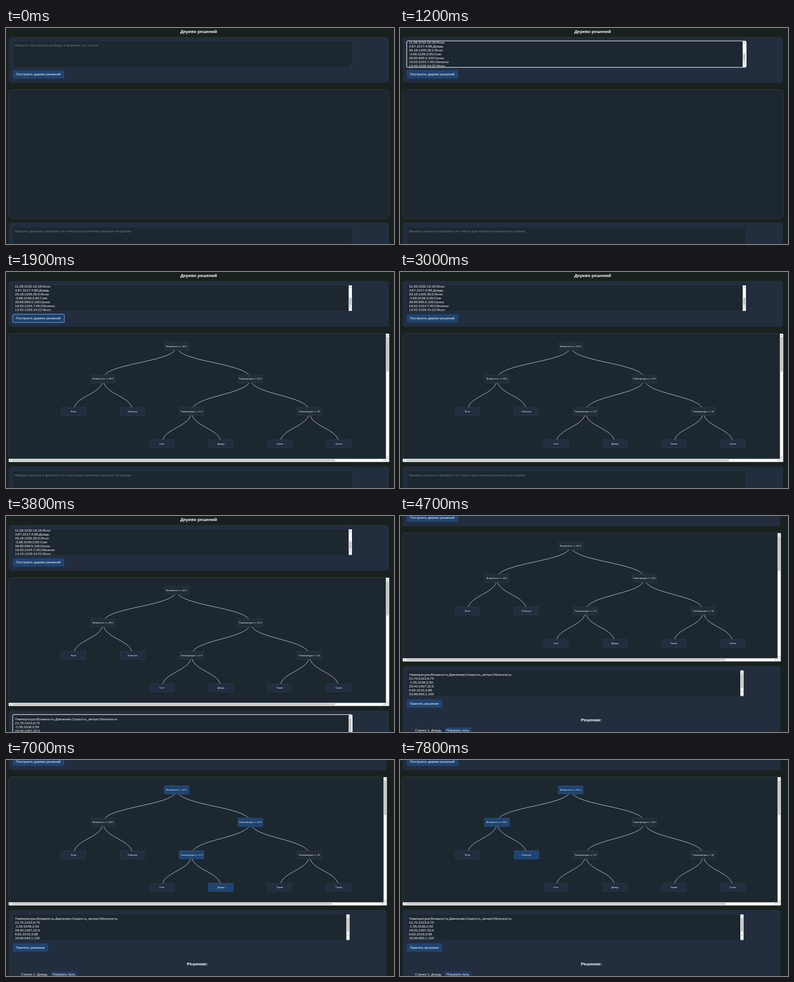
Write an HTML page that moves like this. It is 692 px wide and 388 px high and loops after 8000 ms.

```html
<!DOCTYPE html>
<html lang="ru">
<head>
<meta charset="utf-8">
<title>Дерево решений</title>
<style>
  html, body { margin: 0; width: 100%; height: 100%; overflow: hidden; background: #19211f; }
  svg { display: block; }
  text { font-family: "Liberation Sans", Arial, sans-serif; white-space: pre; }
</style>
</head>
<body>
<svg id="stage" width="692" height="388" viewBox="0 0 692 388"></svg>
<script>
const LOOP = 8000, SCROLL_AT = 4700, SCROLL = 80;
const PANEL = '#222d3e', FIELD = '#1d2730', BLUE = '#1f4471';

const trainRows = ['11;38;1032;16;18;Ясно', '3;87;1017;4;88;Дождь', '26;18;1005;35;0;Ясно',
  '-3;68;1039;3;65;Снег', '38;85;995;5;100;Гроза', '16;52;1014;7;40;Облачно', '13;42;1029;14;22;Ясно'];
const testRows = ['Температура;Влажность;Давление;Скорость_ветра;Облачность', '21;70;1013;6;75',
  '-1;55;1036;2;50', '29;40;1007;22;5', '6;92;1015;3;98', '33;96;993;1;100'];

// Each node: label, centre x, depth, parent index
const nodes = [
  ['Влажность <= 62.5', 304.4, 0],
  ['Влажность <= 46.5', 173, 1, 0],
  ['Температура <= 21.5', 436, 1, 0],
  ['Ясно', 120.5, 2, 1],
  ['Облачно', 225.7, 2, 1],
  ['Температура <= 1.5', 330.8, 2, 2],
  ['Температура <= 31', 541, 2, 2],
  ['Снег', 278.2, 3, 5],
  ['Дождь', 383.4, 3, 5],
  ['Туман', 488.4, 3, 6],
  ['Гроза', 593.6, 3, 6]
];
const rainPath = [0, 2, 5, 8], cloudPath = [0, 1, 4];
const nodeY = depth => 133.6 + depth * 58.35;

const esc = s => s.replace(/</g, '&lt;');
const rect = (x, y, w, h, fill, r = 0, extra = '') =>
  `<rect x="${x}" y="${y}" width="${w}" height="${h}" rx="${r}" fill="${fill}" ${extra}/>`;
const stroke = (color, width = .5) => `stroke="${color}" stroke-width="${width}"`;
const text = (x, y, s, size = 6.15, fill = '#fff', extra = '') =>
  `<text x="${x}" y="${y}" font-size="${size}" fill="${fill}" ${extra}>${esc(s)}</text>`;
const heading = (x, y, s) => text(x, y, s, 7.85, '#fff', 'text-anchor="middle" font-weight="bold"');
const button = (y, w, label, fill, border = 'none') =>
  rect(12, y, w, 15, fill, 1.5, stroke(border, 1)) + text(18, y + 9.6, label);

function arrow(x, y, angle) {
  return `<path d="M-1.3 .7L0 -.8L1.3 .7Z" fill="#666" transform="translate(${x} ${y}) rotate(${angle})"/>`;
}

function scrollbarY(x, y, h, thumbY, thumbH) {
  return rect(x, y, 5.8, h, '#fafafa') + rect(x + 1, y + thumbY, 3.8, thumbH, '#c4c4c4') +
    arrow(x + 2.9, y + 3, 0) + arrow(x + 2.9, y + h - 3, 180);
}

function scrollbarX(x, y, w, thumbX, thumbW) {
  return rect(x, y, w, 5.6, '#fafafa') + rect(x + thumbX, y + 1.2, thumbW, 3.2, '#c8c8c8', 1) +
    arrow(x + 3, y + 2.8, -90) + arrow(x + w - 3, y + 2.8, 90);
}

function textarea(y, right, hint, rows, firstLine, thumb, focused) {
  const h = 46.5, w = right - 12.5;
  let out = rect(12.5, y, w, h, FIELD, 1.5, stroke('#2c3841'));
  if (rows) {
    const lines = rows.map((row, i) => text(3.5, firstLine + i * 7.03, row)).join('');
    out += `<svg x="12.5" y="${y + .4}" width="${w}" height="${h - .8}">${lines}</svg>`;
    out += scrollbarY(right - 5.8, y + .3, h - 6, thumb[0], thumb[1]) +
      rect(right - 5.8, y + h - 5.7, 5.8, 5.4, '#fafafa');
  } else {
    out += text(16, y + 9.6, hint, 6.15, '#70777a');
    if (focused) out += rect(16, y + 4, .5, 6.5, '#fff');
  }
  out += `<path d="M${right - 3} ${y + h - 1}l2 -2M${right - 1.5} ${y + h - 1}l.7 -.7" ${stroke('#9a9fa2', .4)}/>`;
  if (focused) out += rect(12, y - .5, w + 1, h + 1, 'none', 2, stroke('#f4f4f4', 1));
  return out;
}

function tree(glow) {
  let links = '', boxes = '';
  nodes.forEach(([label, x, depth, parent], i) => {
    const y = nodeY(depth);
    if (depth) {
      const [, px, pd] = nodes[parent], py = nodeY(pd), mid = (y + py) / 2;
      links += `<path d="M${px} ${py}C${px} ${mid} ${x} ${mid} ${x} ${y}" fill="none" ${stroke('#d5d9db', .8)}/>`;
    }
    const isLeaf = !label.includes('<');
    const box = (fill, border, extra = '') =>
      rect(x - 22, y - 7.3, 44, 14.6, fill, 1, stroke(border) + extra);
    boxes += box(isLeaf ? '#222e3f' : '#222d38', '#33424f');
    if (glow[i]) boxes += box(BLUE, '#2f639b', ` opacity="${glow[i]}"`);
    boxes += text(x, y + 1.5, label, 4.25, '#fff', 'text-anchor="middle"');
  });
  return links + boxes;
}

function stateAt(t) {
  const fade = at => t < at ? 0 : t < at + 100 ? .5 : 1;
  const rain = fade(6100) - fade(7700), cloud = fade(7700);
  return {
    trainFocus: t >= 900 && t < 1700,
    trainText: t >= 1100,
    buildHover: t >= 1500 && t < 2000,
    buildFocus: t >= 1700 && t < 2000,
    tree: t >= 1900,
    testFocus: t >= 3500 && t < SCROLL_AT,
    testText: t >= 3800,
    scrolled: t >= SCROLL_AT,
    pathButton: t < 5900 ? BLUE : t < 7000 ? '#1c3a63' : '#223a64',
    glow: nodes.map((_, i) => Math.min(1,
      (rainPath.includes(i) ? rain : 0) + (cloudPath.includes(i) ? cloud : 0)))
  };
}

function page(s) {
  const shift = s.scrolled ? 4.2 : 0, right = 683.4 - shift, fieldRight = 617 - shift;
  let out = heading(4.5 + (right - 4.5) / 2 - .4, 8.6, 'Дерево решений');

  out += rect(4.5, 16, right - 4.9, 82.6, PANEL, 5);
  out += textarea(23.7, fieldRight, 'Введите обучающую выборку в формате csv-текста',
    s.trainText && trainRows, 3.4, [22, 13], s.trainFocus);
  out += button(75.8, 92, 'Построить дерево решений',
    s.buildHover ? '#1d406b' : BLUE, s.buildFocus ? '#79a5d6' : 'none');

  out += rect(4.5, 110.5, right - 4.5, 231, FIELD, 4, stroke('#33413f', .7));
  if (s.tree) {
    out += tree(s.glow);
    out += scrollbarY(right - 5.8, 110.8, 224.8, 6, 62) +
      scrollbarX(4.8, 335.6, right - 10.6, 6, 576 - shift * 1.4) +
      rect(right - 5.8, 335.6, 5.8, 5.6, '#fafafa');
  }

  out += rect(4.5, 349.3, right - 4.9, 200, PANEL, 5);
  out += textarea(357.2, fieldRight, 'Введите данные в формате csv-текста для принятия решения по дереву',
    s.testText && testRows, 9.4, [6, 25], s.testFocus);
  out += button(409.2, 63.4, 'Принять решение', BLUE);
  out += heading(341.3, 448.8, 'Решения:');
  out += text(26.7, 467.3, 'Строка 1. Дождь');
  out += rect(79.8, 460, 47.3, 15, s.pathButton, 1.5) + text(83, 467.3, 'Показать путь');
  return `<g transform="translate(0 ${s.scrolled ? -SCROLL : 0})">${out}</g>`;
}

const stage = document.getElementById('stage');
const start = performance.now();
let lastKey = '';

function frame() {
  const state = stateAt((performance.now() - start) % LOOP);
  const key = JSON.stringify(state);
  if (key !== lastKey) {
    stage.innerHTML = page(state);
    lastKey = key;
  }
  requestAnimationFrame(frame);
}
frame();
</script>
</body>
</html>
```
